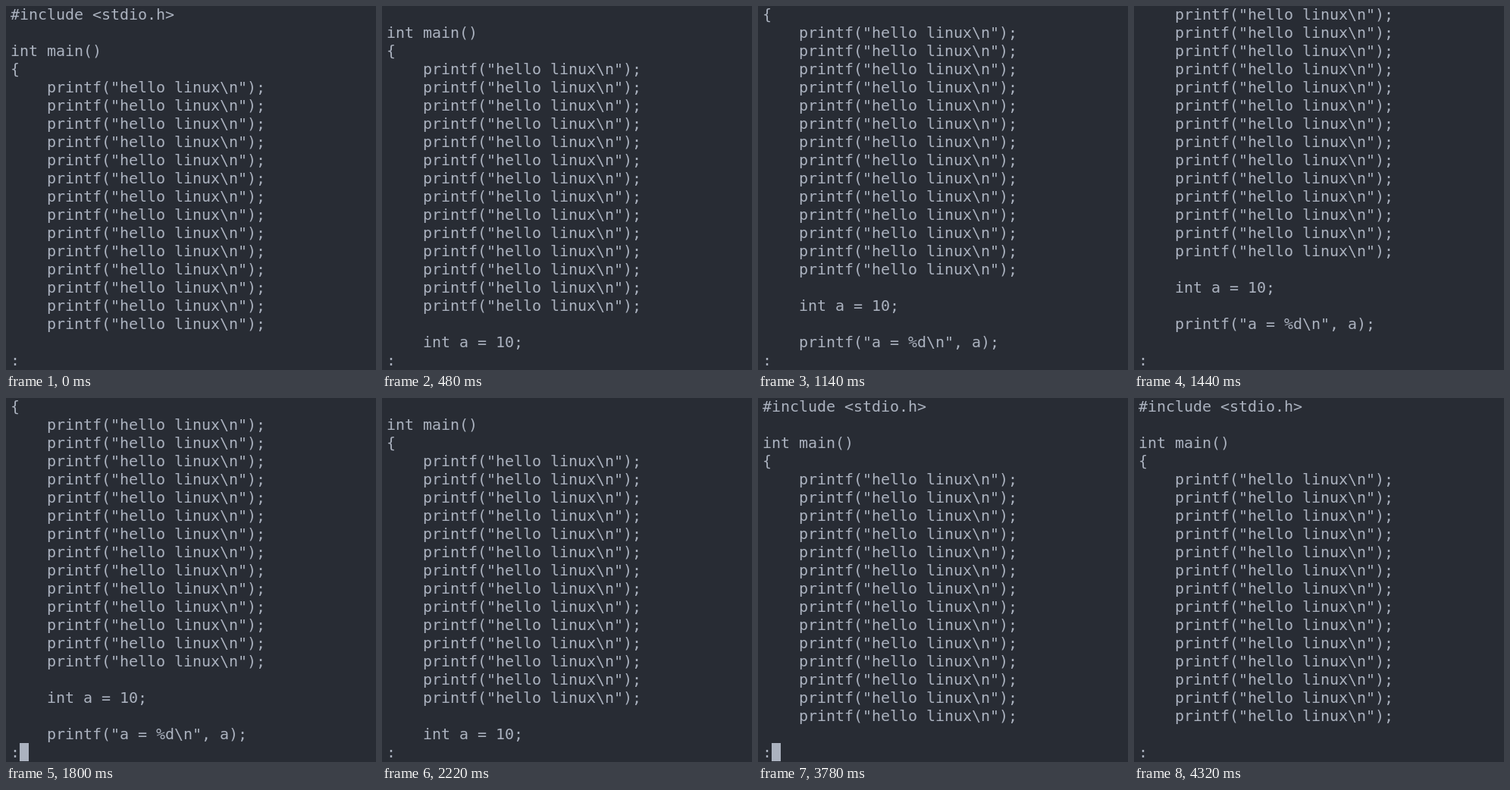
Write an HTML page that moves like this. It is 488 by 480 pixels and loops after 4.44 s.

```html
<!DOCTYPE html>
<html lang="en">
<head>
<meta charset="utf-8">
<title>Pager</title>
<style>
  html, body { margin: 0; width: 100%; height: 100%; overflow: hidden; background: #282c34; }
  pre, #cursor { position: absolute; margin: 0; }
  pre {
    left: 6px; top: -1px;
    color: #abb2bf;
    font: 20px/24px "DejaVu Sans Mono", monospace;
    letter-spacing: -0.041px;
    font-variant-ligatures: none;
  }
  #cursor { left: 18px; top: 455px; width: 12px; height: 24px; background: #abb2bf; }
</style>
</head>
<body>
<pre id="screen"></pre>
<div id="cursor"></div>
<script>
const LOOP = 4440, ROWS = 19;
const screen = document.getElementById('screen');
const cursor = document.getElementById('cursor');

const file = [
  '#include <stdio.h>', '', 'int main()', '{',
  ...Array(14).fill('    printf("hello linux\\n");'),
  '', '    int a = 10;', '', '    printf("a = %d\\n", a);', ''
];

// Key presses that scroll one line down or up, and cursor blinks
const downs = [480, 840, 1140, 1440];
const ups = [1800, 1980, 2220, 2400];
const blinks = [540, 1140, 1620, 2160, 2700, 3240, 3780, 4320];

const passed = (times, t) => times.filter(x => x <= t).length;
let shown = -1;

function draw(now) {
  const t = now % LOOP;
  const top = passed(downs, t) - passed(ups, t);
  if (top !== shown) {
    screen.textContent = [...file.slice(top, top + ROWS), ':'].join('\n');
    shown = top;
  }
  cursor.style.visibility = passed(blinks, t) % 2 ? 'visible' : 'hidden';
}

let start;
function tick(now) {
  start ??= now;
  draw(now - start);
  requestAnimationFrame(tick);
}
draw(0);
requestAnimationFrame(tick);
</script>
</body>
</html>
```
